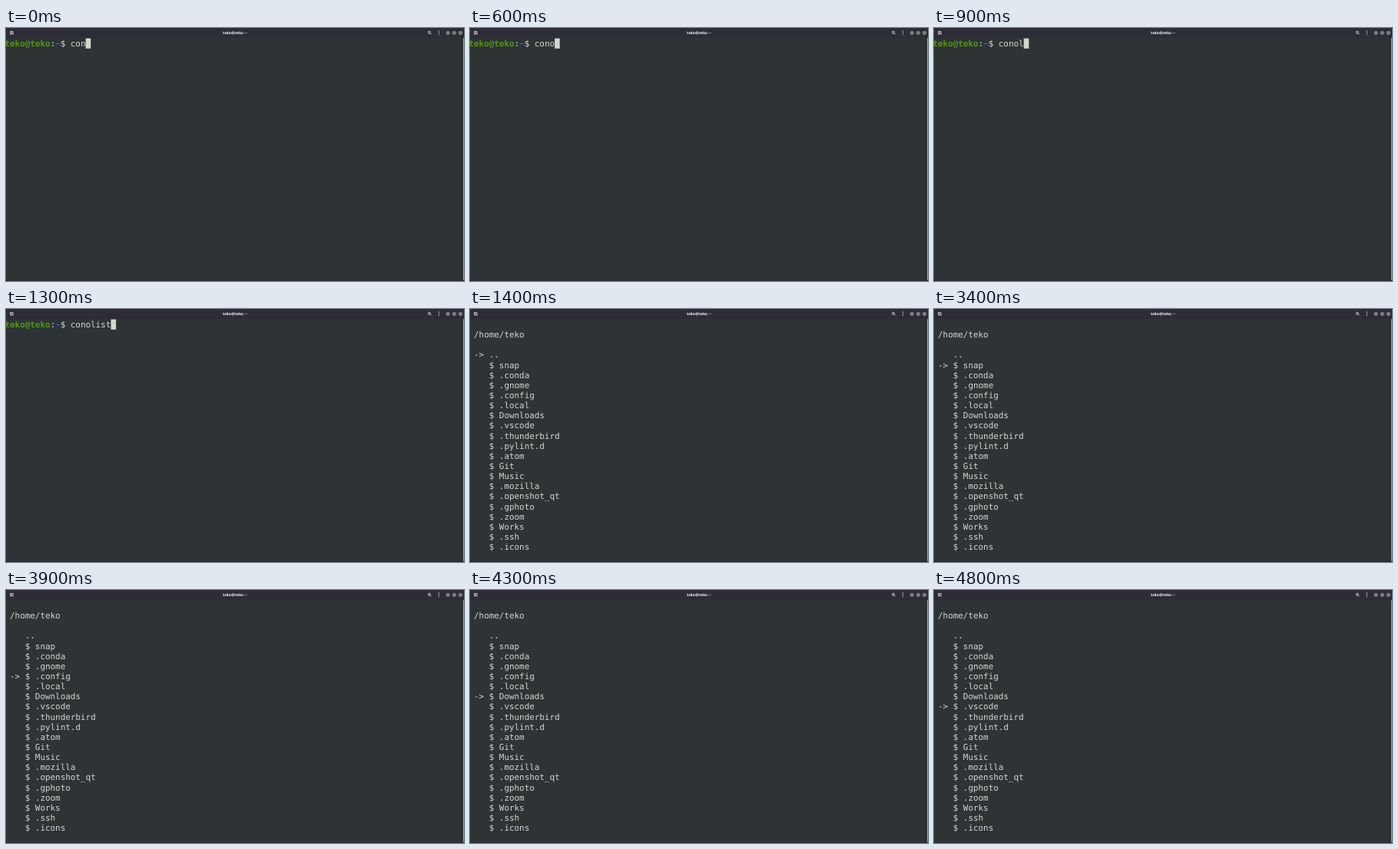
These frames come from a looping animation (595x329 px, 5000 ms). An HTML page:

```html
<!DOCTYPE html>
<html lang="en">
<head>
<meta charset="utf-8">
<title>Terminal</title>
<style>
html, body { margin: 0; width: 100%; height: 100%; overflow: hidden; background: #2e3436; }
svg { display: block; width: 595px; height: 329px; }
text { white-space: pre; text-rendering: geometricPrecision; }
#screen { font: 10.9px "DejaVu Sans Mono", monospace; fill: #d3d7cf; }
.title { font: bold 4.9px "Open Sans", "Noto Sans", sans-serif; fill: #f4f4f4; text-anchor: middle; }
.user { font-weight: bold; fill: #4e9a06; }
.dir { font-weight: bold; fill: #3465a4; }
</style>
</head>
<body>
<svg viewBox="0 0 595 329">
  <rect width="595" height="329" fill="#2e3436"/>
  <rect x="594" y="13" width="1" height="316" fill="#a5a8a9"/>
  <rect y="328" width="595" height="1" fill="#25292b"/>
  <rect width="595" height="13" fill="#2e2d37"/>
  <text class="title" x="297.7" y="7.9">teko@teko: ~</text>
  <g fill="none" stroke="#e4e4e6" stroke-width=".9">
    <path d="M5.6 7V4.6H9V7M5 7.8H9.8M7.3 5.6V7"/>
    <circle cx="549.9" cy="5.7" r="1.5"/>
    <path d="M551 6.8L552.6 8.4"/>
  </g>
  <path d="M562.3 3.6v1.1m0 1.1v1.1m0 1.1v1.1" stroke="#e4e4e6" stroke-width="1.1"/>
  <g fill="#7d7c83">
    <circle cx="574.2" cy="6.3" r="2.6"/>
    <circle cx="582.3" cy="6.3" r="2.6"/>
    <circle cx="590.4" cy="6.3" r="2.6"/>
  </g>
  <g id="screen">
    <g id="shell">
      <text x="-1.5" y="24"><tspan class="user">teko@teko</tspan>:<tspan class="dir">~</tspan>$ <tspan id="typed"></tspan></text>
      <rect id="cursor" y="13.5" width="6.6" height="13.2"/>
    </g>
    <g id="list"></g>
  </g>
</svg>
<script>
const LOOP = 5000, LEFT = -1.5, CELL = 6.562, ROW = 13.14, BASE = 24;
const COMMAND = 'conolist', LIST_AT = 1400;
const keyTimes = [600, 800, 1000, 1100, 1200];
const moveTimes = [3400, 3600, 3800, 3900, 4100, 4300, 4800];
const names = ('snap .conda .gnome .config .local Downloads .vscode .thunderbird .pylint.d .atom ' +
  'Git Music .mozilla .openshot_qt .gphoto .zoom Works .ssh .icons').split(' ');

const get = id => document.getElementById(id);
const [shell, typed, cursor, list] = ['shell', 'typed', 'cursor', 'list'].map(get);
const passed = (times, t) => times.filter(at => at <= t).length;
const rowY = row => BASE + row * ROW;

function addLine(col, row, content) {
  const line = document.createElementNS('http://www.w3.org/2000/svg', 'text');
  line.setAttribute('x', LEFT + col * CELL);
  line.setAttribute('y', rowY(row));
  line.textContent = content;
  return list.appendChild(line);
}

addLine(1, 1, '/home/teko');
addLine(4, 3, '..');
names.forEach((name, i) => addLine(4, 4 + i, '$ ' + name));
const arrow = addLine(1, 3, '->');

function draw(now) {
  const t = now % LOOP;
  const listing = t >= LIST_AT;
  shell.style.display = listing ? 'none' : '';
  list.style.display = listing ? '' : 'none';
  const count = 3 + passed(keyTimes, t);
  typed.textContent = COMMAND.slice(0, count);
  cursor.setAttribute('x', LEFT + (13 + count) * CELL);
  arrow.setAttribute('y', rowY(3 + passed(moveTimes, t)));
}

const start = performance.now();
function tick() {
  draw(performance.now() - start);
  requestAnimationFrame(tick);
}
tick();
</script>
</body>
</html>
```
